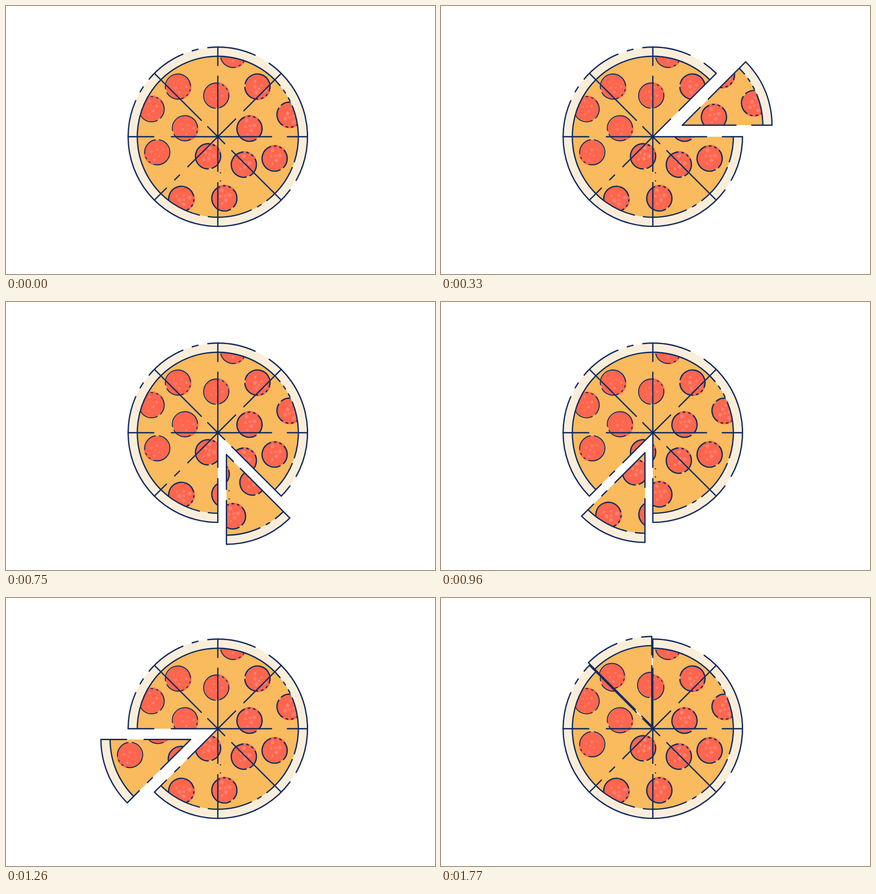
An HTML page with a canvas that plays this animation: 947 px wide and 592 px high, repeating every 1800 ms.

```html
<!DOCTYPE html>
<html lang="en">
<head>
<meta charset="utf-8">
<title>Pizza slices</title>
<style>
  html, body { margin: 0; width: 100%; height: 100%; overflow: hidden; background: #fff; }
  canvas { display: block; }
</style>
</head>
<body>
<canvas id="stage" width="947" height="592"></canvas>
<script>
const ctx = document.getElementById('stage').getContext('2d');
const LOOP = 1800, MOVE = 300, STAGGER = 216, STEP = 30;
const CX = 467.6, CY = 288.8, OUTER = 198, INNER = 177.8, LINE = 2.9;
const NAVY = '#132b5e', CRUST = '#faeedb', CHEESE = '#faba5e', RED = '#ff664e', SPOT = '#ff8070';
const RAD = Math.PI / 180;
const ids = [0, 1, 2, 3, 4, 5, 6, 7];

// Farthest travel of each slice, clockwise from the top
const reach = [80, 78, 73, 58, 53, 72, 75, 60];

// Line gaps as [start, length]: along each cut in pixels, around the rings in degrees
const cutGaps = [[135, 21], [57, 23], [120, 32], [23, 19], [78, 22], [95, 64], [104, 36], [33, 17]];
const rimGaps = [[29.5, 6.5], [204.2, 15.4], [247.5, 15.7], [295, 9.5]];
const edgeGaps = [[18.6, 3.4], [53, 12], [97.2, 5.6], [321, 3.2], [327.5, 3.2], [334, 3.2]];

// Pepperoni: centre, and the angle its fill slips towards
const toppings = [
  [501, 108, 45], [555, 178, 55], [464, 198, -45], [379.5, 178, 30], [321.5, 228, -76],
  [395, 270, 30], [334, 323, 140], [446, 332, -50], [537.5, 271, -80], [626, 240, 90],
  [593, 337, -75], [525, 350.5, -60], [482, 425, -78], [387, 426, 20]
];

function polar(x, y, r, deg) {
  return [x + r * Math.cos(deg * RAD), y + r * Math.sin(deg * RAD)];
}

function disc(x, y, r, color) {
  ctx.fillStyle = color;
  ctx.beginPath();
  ctx.arc(x, y, r, 0, 2 * Math.PI);
  ctx.fill();
}

// Drawn runs between gaps; a long gap keeps a short dash in its middle
function runs(gaps, from, unit) {
  const pad = LINE / 2 / unit, out = [];
  for (const [start, len] of gaps) {
    out.push([from, start - pad]);
    if (len * unit > 37) out.push([start + len * .38, start + len * .62]);
    from = start + len + pad;
  }
  return out;
}

function ring(x, y, r, gaps, width = LINE) {
  const [start, len] = gaps[gaps.length - 1], unit = r * RAD;
  ctx.lineWidth = width;
  ctx.beginPath();
  for (const [a, b] of runs(gaps, start + len - 360 + LINE / 2 / unit, unit)) {
    ctx.moveTo(...polar(x, y, r, a));
    ctx.arc(x, y, r, a * RAD, b * RAD);
  }
  ctx.stroke();
}

function cut(i) {
  ctx.lineWidth = LINE;
  ctx.beginPath();
  for (const [a, b] of runs([cutGaps[i], [OUTER + LINE / 2, 0]], 0, 1)) {
    ctx.moveTo(...polar(CX, CY, a, i * 45 - 90));
    ctx.lineTo(...polar(CX, CY, b, i * 45 - 90));
  }
  ctx.stroke();
}

// Pepperoni towards the upper left are drawn lighter
function pepperoni([x, y, turn]) {
  const light = x + y < 700;
  const [fx, fy] = polar(x, y, 2, turn);
  disc(fx, fy, 28.2, RED);
  for (let k = 0; k < 6; k++) {
    const [sx, sy] = polar(fx, fy, 4 + 2.6 * k, turn + k * 137.5);
    disc(sx, sy, (k % 2 ? 4.2 : 2.8) * (light ? .65 : 1), SPOT);
  }
  const gaps = [-25, 0, 25, 130].map(a => [turn + a - 6, 12]);
  ring(x, y, 27.8, gaps, light ? 2.2 : LINE);
}

function clipTo(part) {
  ctx.beginPath();
  for (const i of part) {
    ctx.moveTo(CX, CY);
    ctx.lineTo(...polar(CX, CY, 400, i * 45 - 90));
    ctx.lineTo(...polar(CX, CY, 400, i * 45 - 45));
    ctx.closePath();
  }
  ctx.clip();
}

// Draws the given slices as one piece
function piece(part, dx, dy) {
  ctx.save();
  ctx.translate(dx, dy);
  ctx.save();
  if (part.length < 8) clipTo(part);
  disc(CX, CY, OUTER, CRUST);
  disc(CX, CY, INNER, CHEESE);
  ctx.save();
  ctx.beginPath();
  ctx.arc(CX, CY, INNER, 0, 2 * Math.PI);
  ctx.clip();
  toppings.forEach(pepperoni);
  ctx.restore();
  ring(CX, CY, OUTER, rimGaps);
  ring(CX, CY, INNER, edgeGaps);
  for (const y of [368.5, 386.5]) disc(473.5, y, 1.4, NAVY);
  ctx.restore();
  new Set(part.flatMap(i => [i, (i + 1) % 8])).forEach(cut);
  ctx.restore();
}

// Out and back, eased both ways
function travel(t, i) {
  const start = Math.floor(i * STAGGER / STEP) * STEP;
  const p = (t - start) / MOVE;
  if (p <= 0 || p >= 1) return 0;
  const u = 1 - Math.abs(2 * p - 1);
  return reach[i] * u * u * (3 - 2 * u);
}

function draw(t) {
  ctx.fillStyle = '#fff';
  ctx.fillRect(0, 0, 947, 592);
  ctx.strokeStyle = NAVY;
  ctx.lineCap = ctx.lineJoin = 'round';
  const shift = ids.map(i => travel(t, i));
  piece(ids.filter(i => !shift[i]), 0, 0);
  for (const i of ids.filter(i => shift[i])) {
    // each slice leans a degree towards the nearest axis
    const lean = i % 2 ? 1 : -1;
    piece([i], ...polar(0, 0, shift[i], i * 45 - 67.5 + lean));
  }
}

let begin;
function tick(now) {
  begin ??= now;
  draw((now - begin) % LOOP);
  requestAnimationFrame(tick);
}
draw(0);
requestAnimationFrame(tick);
</script>
</body>
</html>
```
